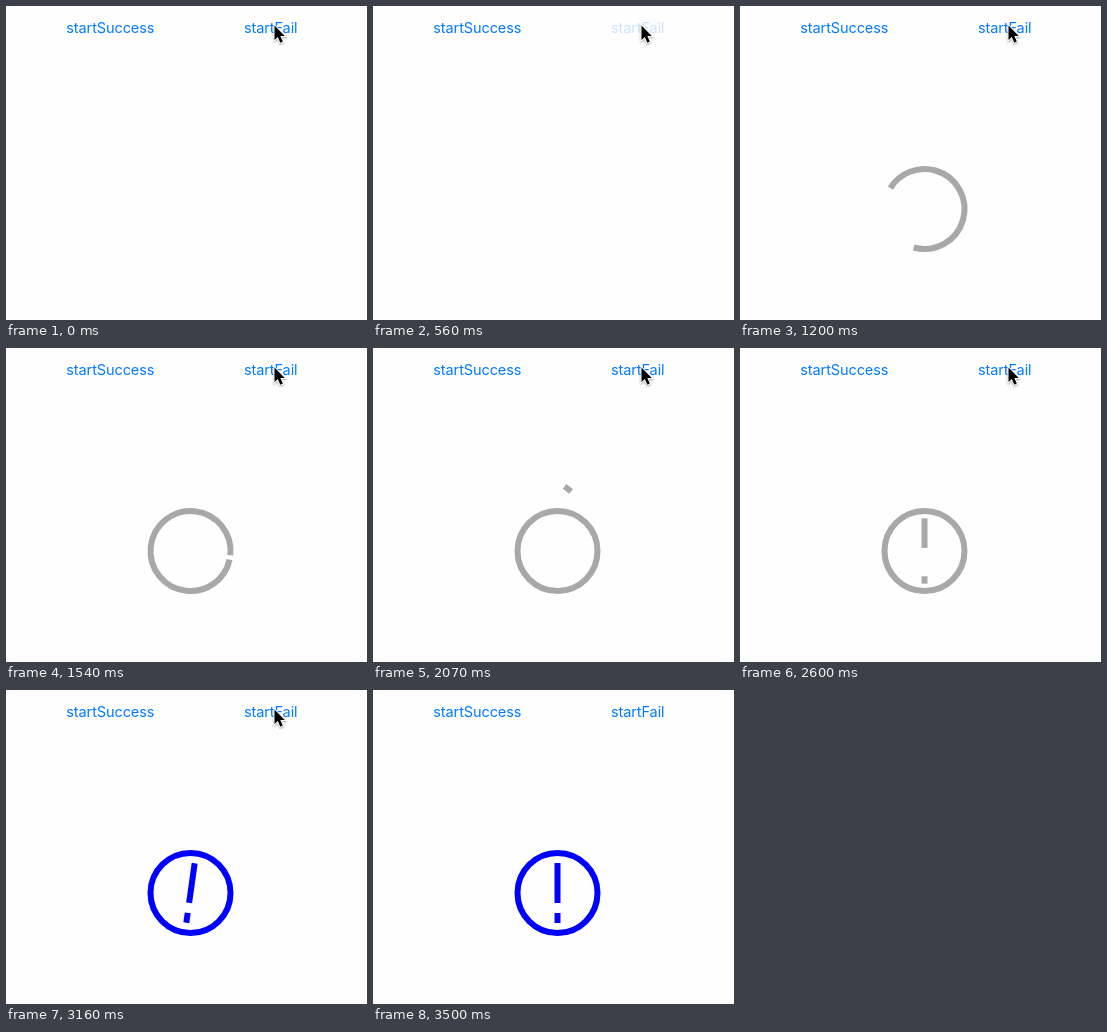
Animation, 361 px wide and 314 px high, one loop 4.31 s. Source, as an HTML page with a canvas:

```html
<!DOCTYPE html>
<html lang="en">
<head>
<meta charset="utf-8">
<title>Loading indicator: failure</title>
<style>
  html, body { margin: 0; width: 100%; height: 100%; overflow: hidden; background: #fefefe; }
  canvas { display: block; }
</style>
</head>
<body>
<canvas width="361" height="314"></canvas>
<script>
const ctx = document.querySelector('canvas').getContext('2d');
const LOOP = 4310, CX = 184.5, CY = 203, R = 40, TOP = CY - R, BOTTOM = CY + R;
const GRAY = '#a8a8a8', BLUE = '#0000ff';

// Start times of the stages, in ms
const PRESS = 560, SPIN = 640, THROW = 1562, FALL = 2135, MARK = 2255, SHAKE = 2724;
const SHAKE_PERIOD = 167, SHAKE_END = SHAKE + 4 * SHAKE_PERIOD;
const CURSOR_LEAVES = 3165, CURSOR_GONE = 3330;

const progress = (t, from, to) => Math.min(1, Math.max(0, (t - from) / (to - from)));
const mix = (a, b, p) => a + (b - a) * p;

function arc(x, radius, from, to) {
  ctx.beginPath();
  ctx.arc(x, CY, radius, from, to, true);
  ctx.stroke();
}

function bar(y1, y2) {
  ctx.fillRect(CX - 3, y1, 6, y2 - y1);
}

function label(text, x, alpha) {
  ctx.globalAlpha = alpha;
  ctx.fillStyle = '#007aff';
  ctx.fillText(text, x, 27);
  ctx.globalAlpha = 1;
}

function cursor(t) {
  if (t >= CURSOR_GONE) return;
  const p = progress(t, CURSOR_LEAVES, CURSOR_GONE);
  ctx.save();
  ctx.translate(mix(268.5, 366, p), mix(19.5, 74, p));
  const arrow = new Path2D('M0 0V14.5L3.3 11.5L5.8 17.2L8.3 16.1L5.8 10.5H10.3Z');
  ctx.lineWidth = 2;
  ctx.strokeStyle = '#fff';
  ctx.shadowColor = 'rgba(0,0,0,.35)';
  ctx.shadowBlur = 2;
  ctx.shadowOffsetY = 1;
  ctx.stroke(arrow);
  ctx.shadowColor = 'transparent';
  ctx.fillStyle = '#000';
  ctx.fill(arrow);
  ctx.restore();
}

function exclamation(t) {
  const p = progress(t, MARK, SHAKE);
  const phase = (t - SHAKE) / SHAKE_PERIOD % 1;
  const swing = t > SHAKE && t < SHAKE_END ? 1 - Math.abs(2 * phase - 1) : 0.5;
  ctx.save();
  ctx.translate(CX, CY);
  ctx.rotate(mix(-Math.PI / 12, Math.PI / 12, swing));
  ctx.translate(-CX, -CY);
  bar(TOP + 10 * p, TOP + 50 * p);
  bar(BOTTOM - 20 * p, BOTTOM - 10 * p);
  ctx.restore();
}

function indicator(t) {
  if (t < SPIN) return;
  ctx.lineWidth = 6;
  ctx.strokeStyle = ctx.fillStyle = t < SHAKE ? GRAY : BLUE;

  if (t < THROW) {
    const left = 1 - progress(t, SPIN, THROW);
    arc(CX, R, Math.PI * (2 + 1.5 * left), Math.PI * 3 * left);
    return;
  }
  arc(CX, R, Math.PI * 2, 0);

  if (t < FALL) {
    const p = progress(t, THROW, FALL);
    const sweep = -Math.PI / 3;
    arc(CX - R, 2 * R, sweep * mix(0, 0.9, p), sweep * mix(0.1, 1, p));
  } else if (t < MARK) {
    const p = progress(t, FALL, MARK);
    const y = CY - R * Math.sqrt(3);
    bar(mix(y, TOP, p), mix(y + 8, TOP, p));
  } else {
    exclamation(t);
  }
}

function draw(now) {
  const t = now % LOOP;
  ctx.fillStyle = '#fefefe';
  ctx.fillRect(0, 0, 361, 314);
  ctx.font = '14.5px Inter, sans-serif';
  ctx.letterSpacing = '-0.1px';
  ctx.textAlign = 'center';
  label('startSuccess', 104.3, 1);
  label('startFail', 264.7, t < PRESS ? 1 : mix(0.2, 1, progress(t, SPIN, 940)));
  indicator(t);
  cursor(t);
}

const start = performance.now();
function tick() {
  draw(performance.now() - start);
  requestAnimationFrame(tick);
}
tick();
</script>
</body>
</html>
```
